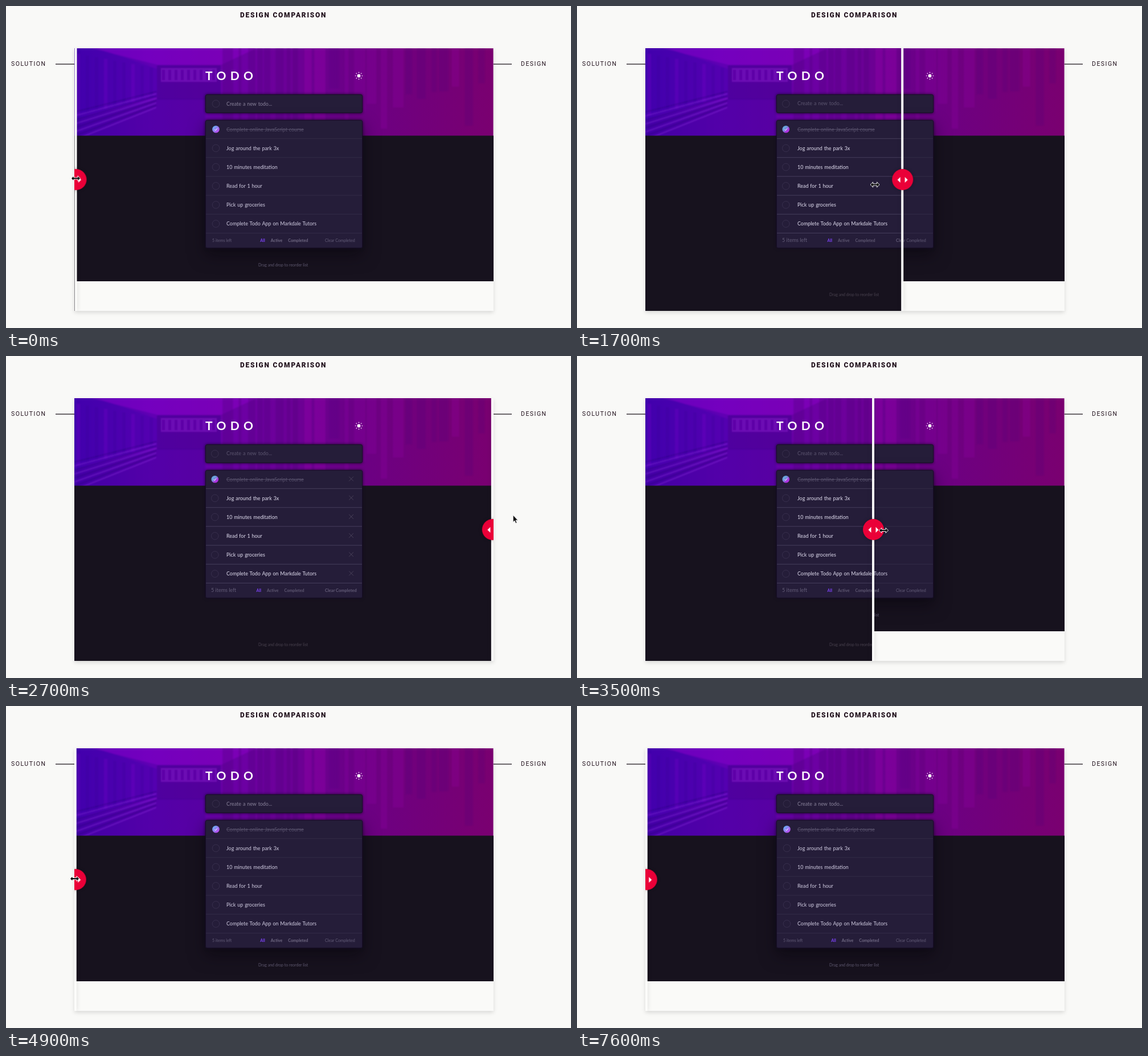
Recreate the animation shown at these times as an HTML page. Size 992 by 565 pixels, loop 8000 ms.

```html
<!DOCTYPE html>
<html lang="en">
<head>
<meta charset="utf-8">
<title>Design comparison</title>
<style>
  html, body { margin: 0; width: 100%; height: 100%; overflow: hidden; background: #f9f9f7; }
  #stage { position: relative; width: 992px; height: 565px; overflow: hidden; color: #21101c; }
  .label { position: absolute; font: 10.5px/14px Roboto, sans-serif; letter-spacing: 1.5px; white-space: nowrap; top: 95px; }
  h1.label { margin: 0; left: 411px; top: 9px; font-size: 12px; font-weight: 900; letter-spacing: 1.75px; }
  .rule { position: absolute; top: 101px; height: 1.5px; width: 33px; background: #6b666a; }
  #view, #shade { position: absolute; left: 120px; top: 74px; width: 736px; height: 461px; }
  #view { overflow: hidden; background: #fafaf8; clip-path: inset(.3px .4px .3px .3px); }
  #shade { box-shadow: 0 3px 7px rgba(0, 0, 0, .13); }
  #view svg { position: absolute; left: 0; top: 0; width: 736px; height: 461px; }
  #view text { font-family: Lato, sans-serif; white-space: pre; }
  #bar { position: absolute; left: -1.75px; top: 0; width: 3.5px; height: 461px; background: #fcfcfa; box-shadow: 0 0 9px rgba(0, 0, 0, .16); }
  #knob { position: absolute; left: -16.75px; top: 212px; width: 37px; height: 37px; border-radius: 50%; background: #ea0038; box-shadow: 0 0 6px rgba(0, 0, 0, .3); }
  #view #knob svg { width: 37px; height: 37px; }
  #cursor { position: absolute; left: 0; top: 0; width: 1px; height: 1px; overflow: visible; }
</style>
</head>
<body>
<div id="stage">
  <h1 class="label">DESIGN COMPARISON</h1>
  <div class="label" style="left:9px">SOLUTION</div>
  <div class="label" style="left:904px">DESIGN</div>
  <div class="rule" style="left:87px"></div>
  <div class="rule" style="left:855px"></div>
  <div id="shade"></div>
  <div id="view">
    <svg id="design" viewBox="120 74 736 461">
      <defs>
        <linearGradient id="wash">
          <stop offset="0" stop-color="#4500ae"/>
          <stop offset=".18" stop-color="#6000b4"/>
          <stop offset=".42" stop-color="#6d00a2"/>
          <stop offset=".68" stop-color="#6b0084"/>
          <stop offset="1" stop-color="#7a0070"/>
        </linearGradient>
        <linearGradient id="tick" x2="1" y2="1">
          <stop offset="0" stop-color="#58c8f5"/>
          <stop offset=".8" stop-color="#b84cf0"/>
        </linearGradient>
        <linearGradient id="tick2" x2="1" y2="1">
          <stop offset=".35" stop-color="#6aa4dc"/>
          <stop offset=".7" stop-color="#b030e0"/>
        </linearGradient>
        <filter id="soft"><feGaussianBlur stdDeviation=".9"/></filter>
        <g id="photo"></g>
      </defs>
    </svg>
    <svg id="solution" viewBox="120 74 736 461"></svg>
    <div id="bar">
      <div id="knob"><svg viewBox="-18.5 -18.5 37 37"><path d="M-9 .5l5-5v10zM9 .5l-5-5v10z" fill="#fff"/></svg></div>
    </div>
  </div>
  <svg id="cursor">
    <path id="resize" d="M-8 0L-3.5-4.5V-1.6H3.5V-4.5L8 0 3.5 4.5V1.6H-3.5V4.5Z" fill="#000" stroke="#fff"/>
    <path id="arrow" d="M.3.3V12.4L3 9.9 5 14.5 7 13.6 5.1 9.2H8.7Z" fill="#111" stroke="#fff" stroke-width=".7"/>
  </svg>
</div>
<script>
const $ = id => document.getElementById(id);
const rand = n => { const v = Math.sin(n * 12.9898) * 43758.5453; return v - Math.floor(v); };

const rect = (x, y, w, h, fill, more = '') =>
  `<rect x="${x}" y="${y}" width="${w}" height="${h}" fill="${fill}" ${more}/>`;
const poly = (points, fill, opacity) => `<polygon points="${points}" fill="${fill}" opacity="${opacity}"/>`;
const line = (x1, y1, x2, y2, stroke, more = '') =>
  `<path d="M${x1} ${y1}L${x2} ${y2}" stroke="${stroke}" fill="none" ${more}/>`;
const dot = (x, y, r, fill, more = '') => `<circle cx="${x}" cy="${y}" r="${r}" fill="${fill}" ${more}/>`;
const text = (x, y, size, fill, str, more = '') =>
  `<text x="${x}" y="${y}" font-size="${size}" fill="${fill}" ${more}>${str}</text>`;

// Tinted corridor behind the header
function corridor() {
  let s = poly('150,74 440,74 378,103 265,103', '#9400d0', .4)
        + poly('120,74 160,74 265,110 265,160 120,195', '#3c00a8', .3)
        + poly('120,200 265,163 350,163 350,228 120,228', '#3c0094', .35)
        + rect(265, 104, 112, 60, '#3c008c', 'opacity=".5"')
        + rect(272, 109, 98, 24, '#8a14cc', 'opacity=".5"');
  for (let i = 0; i < 9; i++)
    s += rect(124 + i * 16, 84 + i * 3, 6, 108 - i * 7, i % 3 ? '#33009c' : '#7a10d0', 'opacity=".25"')
      + rect(274 + i * 11, 112, 5, 18, '#4a0098', 'opacity=".45"');
  for (let i = 0; i < 8; i++)
    s += line(120, 186 + i * 7, 264, 150 + i * 4, i % 2 ? '#9430e6' : '#260074', 'stroke-width="2" opacity=".35"');
  for (let x = 380, i = 1; x < 850; i++) {
    const w = 4 + rand(i) * 16, near = x < 545;
    const h = near ? 153 : 60 + rand(i + 40) * 93;
    s += rect(x, 74, w, h, rand(i + 80) > .5 ? '#a000b4' : '#4c0078', `opacity="${near ? .28 : .18}"`);
    x += w + 2 + rand(i + 120) * 10;
  }
  return rect(120, 74, 736, 154, 'url(#wash)') + `<g filter="url(#soft)">${s}</g>`;
}

function sun() {
  let s = dot(619.5, 122.5, 2.9, '#fff');
  for (let a = 0; a < 8; a++)
    s += dot(619.5 + 5.9 * Math.cos(a * Math.PI / 4), 122.5 + 5.9 * Math.sin(a * Math.PI / 4), .8, '#fff');
  return s;
}

const items = ['Complete online JavaScript course', 'Jog around the park 3x', '10 minutes meditation',
  'Read for 1 hour', 'Pick up groceries', 'Complete Todo App on Markdale Tutors'];

function panel(o) {
  const body = 'word-spacing=".7" font-weight="500"', bold = 'font-weight="700"';
  const ring = y => dot(o.ringX, y, 6.3, 'none', 'stroke="#3a3150" stroke-width=".9"');
  const card = (y, h, shadow) =>
    rect(350.4, y, 275.2, h, '#251d39', `rx="2.5" stroke="#180f28" stroke-width=".9" style="filter:${shadow}"`);
  const glow = 'drop-shadow(0 0 2.5px #120a20)';
  let s = '<use href="#photo"/>' + rect(120, 227.5, 736, o.bottom - 227.5, '#17121e')
    + text(350, 129.7, 21, '#fff', 'TODO', bold + ' letter-spacing="7.3"') + sun()
    + card(155.6, 31.8, glow) + ring(171.5)
    + text(387, o.inputY, 8.9, o.inputInk, 'Create a new todo...', body)
    + card(200.6, 223.8, o.deep ? `${glow} drop-shadow(0 12px 14px rgba(5,2,10,.5))` : glow);
  items.forEach((str, i) => {
    const y = 216.3 + i * 33.15;
    s += line(351, y + 16.4, 625, y + 16.4, o.ruleInk, 'stroke-width=".9"');
    s += i ? ring(y) : dot(o.ringX, y, 6.3, `url(#${o.tick})`)
      + `<path d="M${o.ringX - 2.5} ${y + .3}l1.8 1.8 3.4-3.8" stroke="#fff" fill="none"/>`;
    s += text(387, y + 3.2, 8.9, i ? o.itemInk : '#57506b', str,
      body + (i ? '' : ' text-decoration="line-through"'));
    if (o.cross) s += line(602.2, y - 4.6, 610, y + 3.2, '#484058') + line(610, y - 4.6, 602.2, y + 3.2, '#484058');
  });
  const foot = (x, fill, str) => text(x, 414.3, 7.2, fill, str, bold);
  return s + text(o.leftX, 414.3, o.leftSize, '#645d78', '5 items left')
    + foot(o.allX, '#7a42f2', 'All')
    + foot(o.allX + 18.5, o.footInk, 'Active')
    + foot(o.allX + 49, o.footInk, 'Completed')
    + text(560, 414.3, o.clearSize, '#645d78', 'Clear Completed', o.cross ? bold : '')
    + text(443, o.hintY, 7, o.hintInk, 'Drag and drop to reorder list');
}

$('photo').innerHTML = corridor();
$('design').insertAdjacentHTML('beforeend', panel({
  bottom: 483, ringX: 368.5, inputY: 174.8, inputInk: '#827b94', itemInk: '#c5c0d6', ruleInk: '#352d49',
  deep: true, tick: 'tick', allX: 446.3, footInk: '#716a84', leftX: 362, leftSize: 7, clearSize: 7.2,
  hintY: 457, hintInk: '#5f586f'
}));
$('solution').innerHTML = panel({
  bottom: 535, ringX: 366.8, inputY: 174.2, inputInk: '#57506b', itemInk: '#d3cfe2', ruleInk: '#4a4260',
  tick: 'tick2', allX: 439.5, footInk: '#5f5872', leftX: 360, leftSize: 9, clearSize: 7.5,
  hintY: 508.7, hintInk: '#49424f', cross: true
});

// Motion runs in steps of 100 ms
const STEP = 100, COUNT = 80;
const linear = u => u, smooth = u => u * u * (3 - 2 * u);
const easeOut = u => Math.sin(u * Math.PI / 2), easeIn = u => u ** 1.69;

// Keys are [step, values, easing towards the key]
function at(keys, n) {
  const i = keys.findIndex(k => k[0] >= n);
  if (i < 1) return keys.at(i)[1];
  const [a, from] = keys[i - 1], [b, to, ease = linear] = keys[i];
  const u = ease((n - a) / (b - a));
  return from.map((v, j) => v + (to[j] - v) * u);
}

const sweeps = [[3, [122.5]], [10, [361.5], easeOut], [21.6, [853.8], easeIn], [28, [853.8]],
  [35, [520], smooth], [37, [586], smooth], [45.5, [121.7], smooth]];
const dragY = [[3, [302.5]], [10, [315.5]], [17, [313.5]], [22, [300]], [29, [300]], [35, [306]]];
const roam = [[22, [840, 300]], [25, [888, 280]], [26, [888, 280]], [27, [890, 279]], [28, [872, 290]],
  [46, [94, 318.5]], [47, [94, 318.5]], [49, [120.5, 303]], [60, [120.5, 303]], [63, [164, 290]],
  [64, [164, 290]], [67, [258, 238]], [71, [258, 238]], [74, [110, 34]]];

const barX = n => at(sweeps, n)[0];
const isDrag = n => n < 23 || (n > 28 && n < 46);
const isResize = n => isDrag(n) || (n >= 49 && n < 61);
// While dragging, the pointer trails the bar by one step
const pointer = n => isDrag(n) ? [barX(n - 1), at(dragY, n)[0]] : at(roam, n);

function play(id, frame) {
  const frames = [];
  for (let n = 0; n <= COUNT; n++)
    frames.push({ ...frame(Math.min(n, COUNT - 1)), offset: n / COUNT, easing: 'step-end' });
  $(id).animate(frames, { duration: COUNT * STEP, iterations: Infinity });
}

const show = on => ({ opacity: on ? 1 : 0 });
play('bar', n => ({ transform: `translateX(${barX(n) - 120}px)` }));
play('solution', n => ({ clipPath: `inset(0 ${856 - barX(n)}px 0 0)` }));
play('cursor', n => ({ transform: `translate(${pointer(n).join('px,')}px)` }));
play('resize', n => show(isResize(n)));
play('arrow', n => show(!isResize(n) && n < 76));
</script>
</body>
</html>
```
